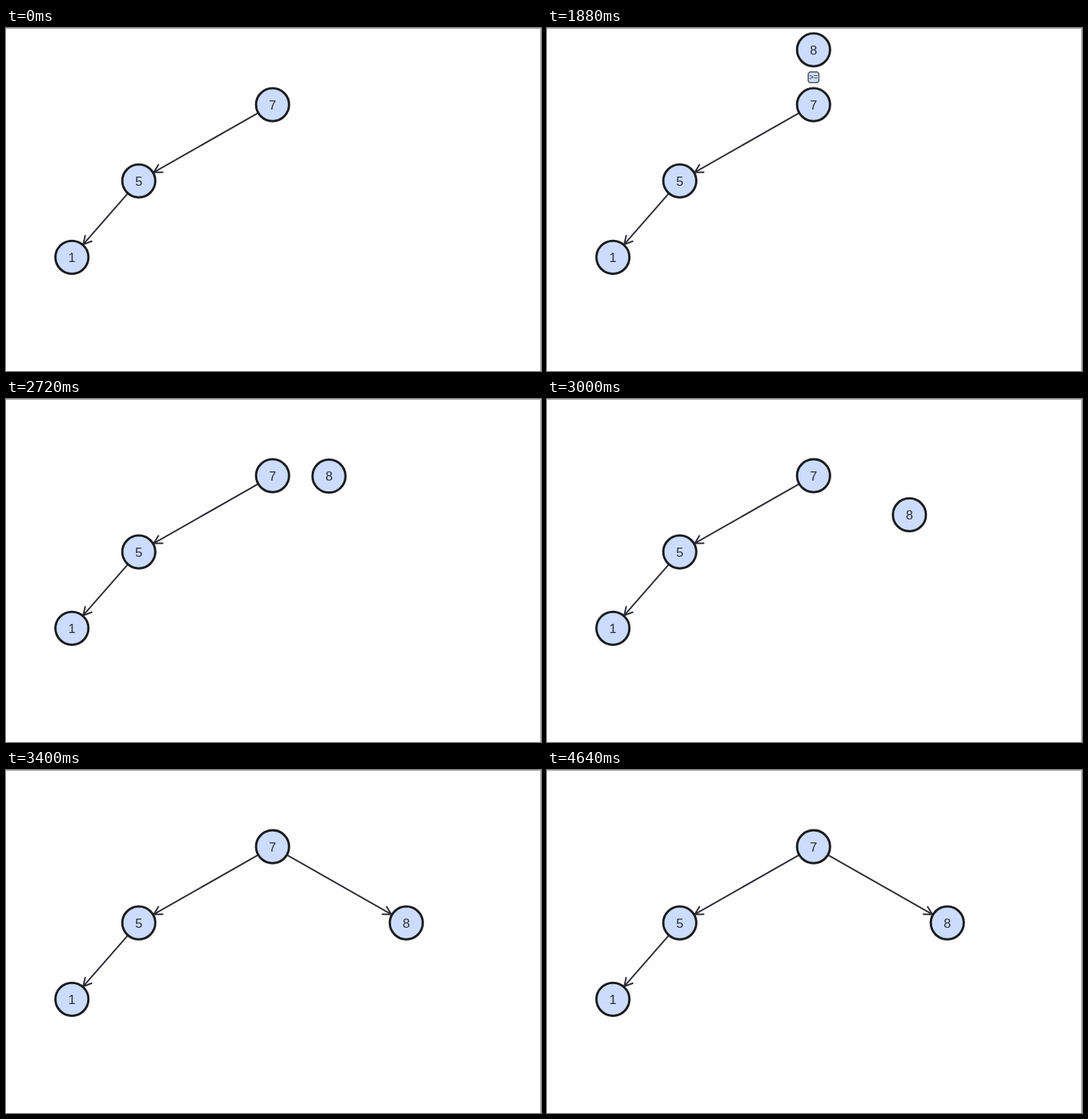
Recreate the animation shown at these times as an HTML page. Size 700 px wide and 450 px high, loop 4840 ms.

```html
<!DOCTYPE html>
<html lang="en">
<head>
<meta charset="utf-8">
<title>Tree insertion</title>
<style>
  html, body { margin: 0; width: 100%; height: 100%; overflow: hidden; background: #fefefe; }
  svg { display: block; width: 700px; height: 450px; }
  .frame { fill: none; stroke: #a6a6ab; }
  .node circle { fill: #cbdcfe; stroke: #1c1c1e; stroke-width: 3; }
  .edge { fill: none; stroke: #2d2d38; stroke-width: 2; }
  .sign rect { fill: #cbdcfe; stroke: #33333d; stroke-width: 1.2; }
  text { font-family: "Liberation Sans", Arial, sans-serif; fill: #2e2e33; text-anchor: middle; }
  .node text { font-size: 17px; }
  .sign text { font-size: 10px; }
</style>
</head>
<body>
<svg id="stage" viewBox="0 0 700 450">
  <path class="frame" d="M0 .5H699.5V450"/>
</svg>
<script>
const LOOP = 4840;
const SHOW = 1080, COMPARE = 1880, MOVE = 2320, ARRIVE = 3270, LINK = 3280;
const stage = document.getElementById("stage");

function add(parent, tag, attrs, text) {
  const el = document.createElementNS("http://www.w3.org/2000/svg", tag);
  for (const key in attrs) el.setAttribute(key, attrs[key]);
  if (text) el.textContent = text;
  return parent.appendChild(el);
}

const place = (el, [x, y]) => el.setAttribute("transform", `translate(${x} ${y})`);
const show = (el, on) => el.setAttribute("visibility", on ? "visible" : "hidden");

function node(label, pos) {
  const g = add(stage, "g", { class: "node" });
  add(g, "circle", { r: 21.6 });
  add(g, "text", { y: 6 }, label);
  place(g, pos);
  return g;
}

// Straight edge between two node rims, ending in an open arrowhead
function edge([x1, y1], [x2, y2]) {
  const a = Math.atan2(y2 - y1, x2 - x1);
  const polar = (x, y, r, t) => [x + r * Math.cos(t), y + r * Math.sin(t)];
  const start = polar(x1, y1, 22, a);
  const tip = polar(x2, y2, -22.5, a);
  const barb = turn => polar(...tip, -12.5, a + turn);
  return add(stage, "path", {
    class: "edge",
    d: `M${start}L${tip}M${barb(0.5)}L${tip}L${barb(-0.5)}`
  });
}

const root = [348.75, 100.6], left = [173.75, 200.6], leaf = [86.25, 300.8];
const entry = [348.75, 28.6], right = [523.75, 200.6];

edge(root, left);
edge(left, leaf);
const link = edge(root, right);
node("7", root);
node("5", left);
node("1", leaf);
const added = node("8", entry);

const sign = add(stage, "g", { class: "sign" });
add(sign, "rect", { x: -7, y: -7, width: 14, height: 14, rx: 3 });
add(sign, "text", { y: 3.5 }, ">=");
place(sign, [348.75, 64.7]);

function draw(t) {
  const p = Math.min(1, Math.max(0, (t - MOVE) / (ARRIVE - MOVE)));
  place(added, entry.map((v, i) => v + (right[i] - v) * p));
  show(added, t >= SHOW);
  show(sign, t >= COMPARE && t < MOVE);
  show(link, t >= LINK);
}

const begin = performance.now();
function tick() {
  draw((performance.now() - begin) % LOOP);
  requestAnimationFrame(tick);
}
tick();
</script>
</body>
</html>
```
